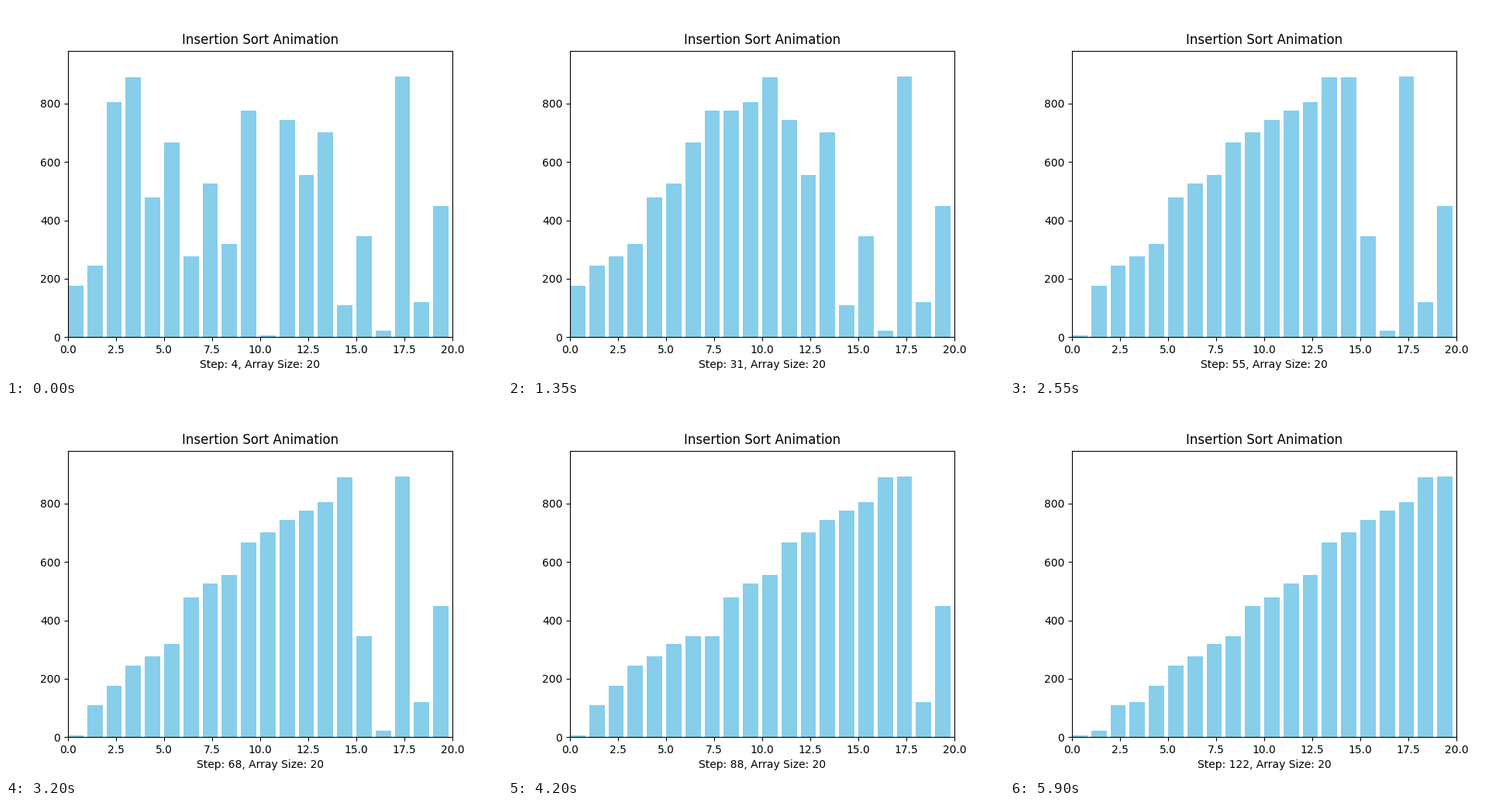
A matplotlib script that plays this animation: 640 px wide and 480 px high, repeating every 8 s.

```python
import matplotlib.pyplot as plt
from matplotlib.animation import FuncAnimation

INTERVAL = 50
FRAMES = 160
FIRST_STEP = 4
SORTED_PREFIX = 4
VALUES = [175, 245, 805, 890, 478, 667, 277, 526, 319, 775,
          6, 744, 555, 701, 109, 346, 22, 892, 120, 449]


def insertion_sort(values, start):
    """Yield the list after every shift and every insertion."""
    a = list(values)
    yield a[:]
    for i in range(start, len(a)):
        key = a[i]
        j = i - 1
        while j >= 0 and a[j] > key:
            a[j + 1] = a[j]
            j -= 1
            yield a[:]
        a[j + 1] = key
        yield a[:]


states = list(insertion_sort(VALUES, SORTED_PREFIX))
size = len(VALUES)

plt.rcParams["font.family"] = "DejaVu Sans"
fig, ax = plt.subplots(figsize=(6.4, 4.8), dpi=100)
ax.set_title("Insertion Sort Animation")
bars = ax.bar(range(size), VALUES, align="edge", color="skyblue")
ax.set_xlim(0, size)
ax.set_ylim(0, 1.1 * max(VALUES))


def update(frame):
    k = min(frame, len(states) - 1)  # hold the sorted list at the end
    for bar, height in zip(bars, states[k]):
        bar.set_height(height)
    ax.set_xlabel(f"Step: {FIRST_STEP + k}, Array Size: {size}")
    return bars


anim = FuncAnimation(fig, update, frames=FRAMES, interval=INTERVAL,
                     init_func=lambda: update(0), repeat=True,
                     repeat_delay=0, blit=False)

plt.show()
```
